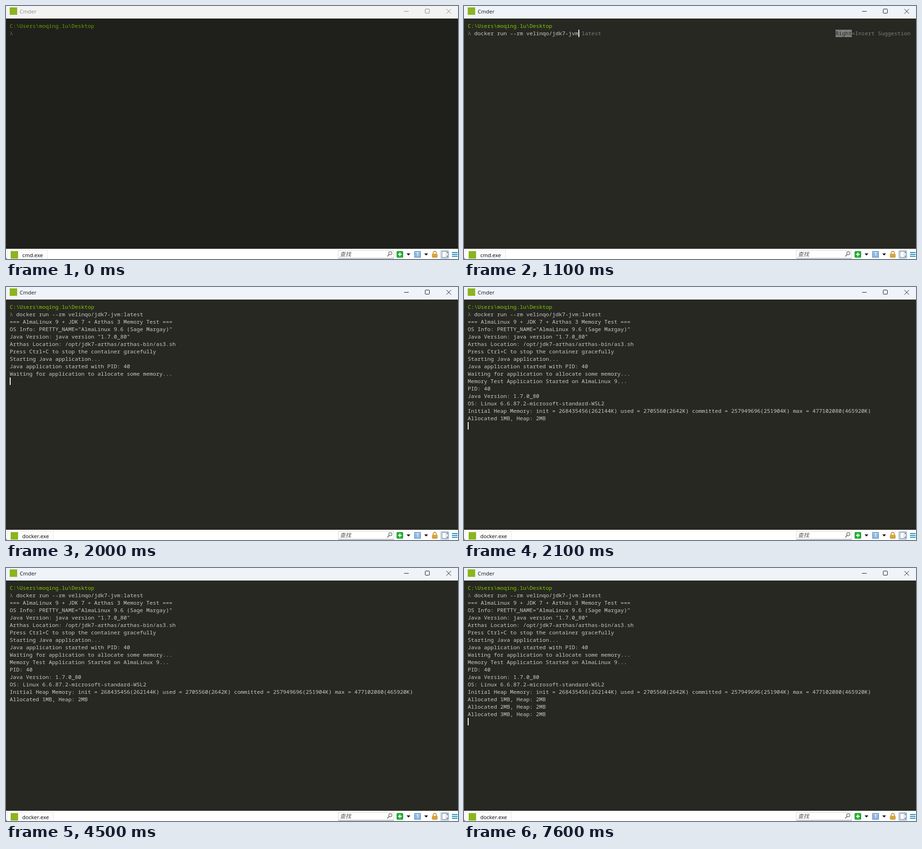
These frames come from a looping animation (972 px wide and 545 px high, 8 s). An HTML page:

```html
<!DOCTYPE html>
<html lang="en">
<head>
<meta charset="utf-8">
<title>Terminal</title>
<style>
  html, body { margin: 0; width: 100%; height: 100%; overflow: hidden; background: #fff; }
  svg { display: block; width: 972px; height: 545px; }
  text { white-space: pre; }
  .mono { font: 500 11.667px "Noto Sans Mono", "DejaVu Sans Mono", monospace; font-variant-ligatures: none; }
  .ui { font: 11.4px "Open Sans", "Noto Sans", sans-serif; }
  .hint { font: italic 12px "Noto Sans CJK SC", "Noto Sans CJK", sans-serif; }
  .crisp { shape-rendering: crispEdges; }
</style>
</head>
<body>
<svg id="stage" viewBox="0 0 972 545" xmlns="http://www.w3.org/2000/svg">
  <rect id="bar" width="972" height="27"/>
  <rect x="8" y="3" width="16" height="16" fill="#8bb41e"/>
  <text id="title" class="ui" x="29.5" y="16">Cmder</text>
  <g id="buttons" fill="none">
    <path class="crisp" d="M856 11.5h10"/>
    <rect x="901.5" y="6.5" width="9" height="9" rx="1"/>
    <path d="M947 6.500l10 10M957 6.500l-10 10"/>
  </g>

  <rect id="back" y="27" width="972" height="496"/>
  <g id="lines"></g>
  <rect id="cursor" class="crisp" width="2" height="16" fill="#f2f2f2"/>

  <rect y="523" width="972" height="22" fill="#fff"/>
  <path d="M0 541v4h4q-3 0-4-4z" fill="#777"/>
  <path id="tab" class="crisp" fill="#fcfcfc" stroke="#e6e6e6"/>
  <rect x="10" y="528" width="16" height="16" fill="#8bb41e"/>
  <text id="process" class="ui" x="35" y="541"></text>

  <g class="crisp">
    <rect x="714.5" y="526.5" width="119" height="17" fill="#fff" stroke="#d9d9d9"/>
    <path d="M715 543.5h119" stroke="#868686"/>
  </g>
  <text class="hint" x="718" y="539" fill="#555">查找</text>
  <g fill="none" stroke="#666">
    <circle cx="826.5" cy="532.500" r="3.400" stroke-width="1.300"/>
    <path d="M824 535l-4 4.500" stroke-width="1.800"/>
  </g>

  <rect x="840.5" y="528.5" width="13" height="13" rx="1" fill="#22b733" stroke="#108a20"/>
  <path class="crisp" d="M847 531v8M843 535h8" stroke="#fff" stroke-width="2"/>
  <path d="M861.500 533h8l-4 4.500zM899.500 533h8l-4 4.500z" fill="#111"/>
  <rect x="878.5" y="528.5" width="13" height="13" fill="#8fb9e3" stroke="#5786b9"/>
  <path class="crisp" d="M879 530.500h12" stroke="#c7def3"/>
  <path d="M883.500 533l2-1.500v7" fill="none" stroke="#eef6ff" stroke-width="1.500"/>

  <path d="M918.500 535v-3a3.500 3.500 0 0 1 7 0v3" fill="none" stroke="#c19332" stroke-width="1.800"/>
  <rect x="916.5" y="534.5" width="11" height="7" rx="1" fill="#e5b445" stroke="#bb8423"/>
  <path class="crisp" d="M918 537.500h8M918 539.500h8" stroke="#c8922c"/>

  <rect x="934.5" y="526.5" width="18" height="18" rx="2" fill="#d6e7f6" stroke="#aac9e6"/>
  <rect x="937.5" y="528.5" width="13" height="13" fill="#fff" stroke="#717983"/>
  <path class="crisp" d="M946.500 529v12" stroke="#a5adb5"/>
  <path class="crisp" d="M948 531h2M948 539h2" stroke="#65717d" stroke-width="2"/>
  <path class="crisp" d="M959 531h12M959 535h12M959 539h12" stroke="#1689bf" stroke-width="2"/>
</svg>

<script>
const LOOP = 8000, LEFT = 8, TOP = 35, CELL = 7, ROW = 16, NEVER = LOOP;
const el = id => document.getElementById(id);
const timed = [];

function node(name, attrs) {
  const n = document.createElementNS("http://www.w3.org/2000/svg", name);
  for (const key in attrs) n.setAttribute(key, attrs[key]);
  el("lines").append(n);
  return n;
}

function write(str, row, col = 0, start = 0, end = NEVER, fill = "#cacaca") {
  const n = node("text", { class: "mono", x: LEFT + col * CELL, y: TOP + row * ROW + 12, fill });
  n.textContent = str;
  timed.push({ n, start, end });
  return n;
}

const path = write("C:\\Users\\moqing.lu\\Desktop", 0);
const prompt = write("λ", 1);
const command = "docker run --rm velinqo/jdk7-jvm";
const gray = "#7c7c7c";

write(command, 1, 2, 1100);
write(":latest", 1, 34, 1100, 1200, gray);
write(":latest", 1, 34, 1200);

timed.push({
  n: node("rect", { class: "crisp", x: 799, y: 51, width: 35, height: 16, fill: gray }),
  start: 1100, end: 1200
});
write("Right", 1, 113, 1100, 1200, "#272822");
write("=Insert Suggestion", 1, 118, 1100, 1200, gray);

const output = [
  [2000, "=== AlmaLinux 9 + JDK 7 + Arthas 3 Memory Test ==="],
  [2000, 'OS Info: PRETTY_NAME="AlmaLinux 9.6 (Sage Margay)"'],
  [2000, 'Java Version: java version "1.7.0_80"'],
  [2000, "Arthas Location: /opt/jdk7-arthas/arthas-bin/as3.sh"],
  [2000, "Press Ctrl+C to stop the container gracefully"],
  [2000, "Starting Java application..."],
  [2000, "Java application started with PID: 40"],
  [2000, "Waiting for application to allocate some memory..."],
  [2100, "Memory Test Application Started on AlmaLinux 9..."],
  [2100, "PID: 40"],
  [2100, "Java Version: 1.7.0_80"],
  [2100, "OS: Linux 6.6.87.2-microsoft-standard-WSL2"],
  [2100, "Initial Heap Memory: init = 268435456(262144K) used = 2705560(2642K) committed = 257949696(251904K) max = 477102080(465920K)"],
  [2100, "Allocated 1MB, Heap: 2MB"],
  [4800, "Allocated 2MB, Heap: 2MB"],
  [7600, "Allocated 3MB, Heap: 2MB"]
];
output.forEach(([start, str], i) => write(str, i + 2, 0, start));

// Cursor: time, row, column; a bare time hides it.
const cursorSteps = [
  [0], [300, 1, 2], [800], [1100, 1, 34], [1200, 1, 41], [1600, 2, 0],
  [2000, 10, 0], [2100, 16, 0], [2600], [3000, 16, 0], [3500], [4000, 16, 0], [4500],
  [4800, 17, 0], [5300], [5800, 17, 0], [6300], [6800, 17, 0], [7200], [7600, 18, 0]
];

const show = (n, on) => n.setAttribute("visibility", on ? "visible" : "hidden");
const paint = (n, fill) => n.setAttribute("fill", fill);

function render(t) {
  const active = t >= 200, lit = t >= 300, running = t >= 1700;

  paint(el("bar"), active ? "#eff4fb" : "#f3f3f3");
  paint(el("title"), active ? "#111" : "#8b8b8b");
  el("buttons").setAttribute("stroke", active ? "#111" : "#858585");

  paint(el("back"), lit ? "#272822" : "#1f201b");
  paint(path, lit ? "#80c800" : "#649c00");
  paint(prompt, lit ? gray : "#60605d");
  for (const { n, start, end } of timed) show(n, t >= start && t < end);

  const [, row, col] = cursorSteps.findLast(step => step[0] <= t);
  show(el("cursor"), row !== undefined);
  if (row !== undefined) {
    el("cursor").setAttribute("x", LEFT + col * CELL);
    el("cursor").setAttribute("y", TOP + row * ROW);
  }

  el("process").textContent = running ? "docker.exe" : "cmd.exe";
  el("tab").setAttribute("d", `M2.5 546V525.5H${running ? 101.5 : 89.5}V546`);
}

const origin = performance.now();
function frame() {
  render((performance.now() - origin) % LOOP);
  requestAnimationFrame(frame);
}
frame();
</script>
</body>
</html>
```
